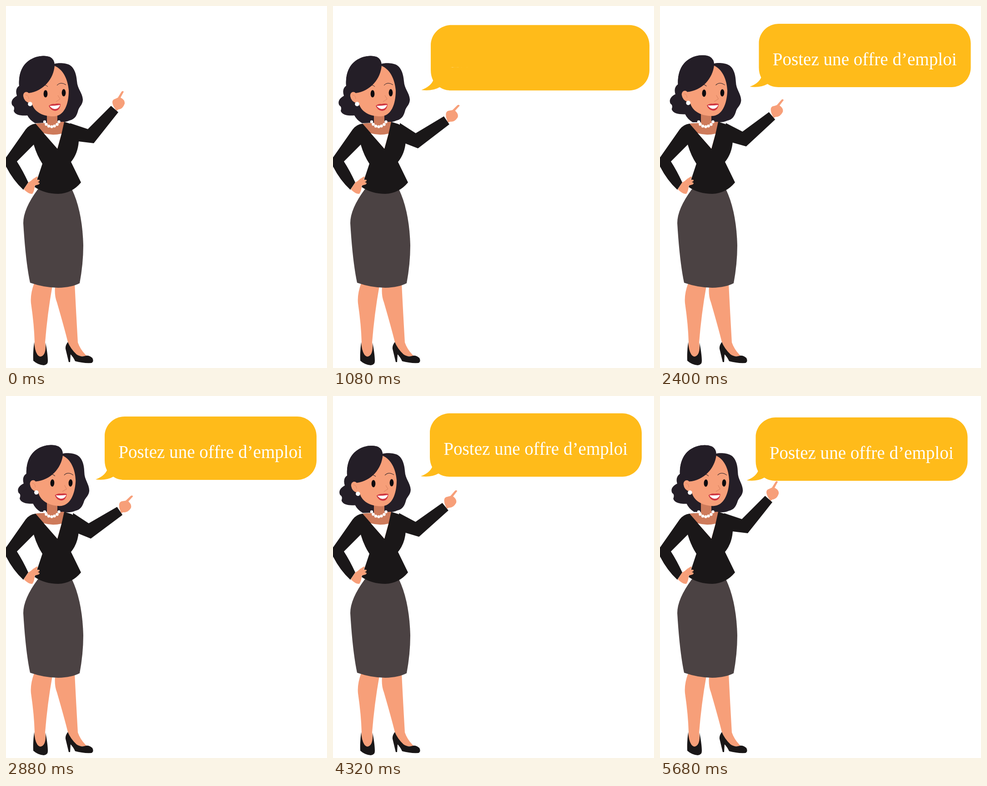
Animation of 706 by 794 pixels, one loop 5.72 s. Source, as an HTML page:

```html
<!DOCTYPE html>
<html lang="fr">
<head>
<meta charset="utf-8">
<style>
  html, body { margin: 0; width: 100%; height: 100%; overflow: hidden; background: #fff; }
  svg { display: block; }
  text { font: 39.1px "Liberation Serif", "Times New Roman", serif; fill: #fff; }
  .skin { fill: #f79f79; }
  .shade { fill: #ce7b5b; }
  .hair { fill: #241e27; }
  .suit { fill: #1a1718; }
  .white { fill: #fff; }
  .line { fill: none; stroke-width: 1; }
</style>
</head>
<body>
<svg width="706" height="794" viewBox="0 0 706 794">
  <g id="bubble">
    <path fill="#ffbb1a" d="M257 43H636C660 43 679 62 679 86V139C679 163 660 182 636 182H256Q242 182 232 175Q216 184 193 181Q212 174 218 161Q213 151 213 139V86C213 62 233 43 257 43Z"/>
    <g id="label"></g>
  </g>

  <path id="backHair" class="hair" d="M64 257Q52 250 47 240C35 241 20 240 17 230Q20 221 14 218C10 211 13 203 24 197Q19 182 29 175C27 148 36 130 50 120C65 109 85 107 97 112Q105 117 106 127C115 124 130 125 137 128C150 133 155 150 156 165C157 182 168 190 169 205C169 216 162 220 159 228C156 240 152 248 140 251Q130 256 115 255Z"/>

  <path class="skin" d="M62 608Q53 632 55 652Q62 700 63 738L61 766Q75 777 89 766L86 738Q91 675 102 614Z"/>
  <path class="skin" d="M108 614Q106 635 112 650Q128 705 136 737L150 768 178 768Q164 755 158 738Q154 670 151 608Z"/>
  <path class="suit" d="M62 737Q59 760 60 778Q70 787 83 788Q92 787 92 779Q92 765 87 738Q89 768 75 769Q64 766 62 737Z"/>
  <path class="suit" d="M136 737Q130 745 131 752L138 781H141L142 764Q148 770 152 779Q170 784 188 783Q194 780 190 772Q183 766 176 767Q165 771 155 764Q142 752 136 737Z"/>
  <path fill="#4b4243" d="M70 402Q38 445 38 476Q43 560 53 607Q85 618 115 618Q145 617 162 608Q170 565 170 525Q168 450 145 402Z"/>

  <path class="suit" d="M65 258Q51 260 43 271L-4 338V345L0 352Q16 383 38 403L49 387Q37 361 24 341L61 304Q68 328 80 346L63 397Q85 412 115 412Q145 411 165 387L143 342Q158 324 160 297L158 268 144 259 128 254Z"/>
  <path class="skin" d="M39 402L49 387Q55 384 60 379L68 374Q72 375 67 381L73 381Q76 384 70 386L74 388Q74 391 70 392L63 394Q63 405 58 412Q50 413 39 402Z"/>
  <path class="shade" d="M90 232H113V254H128L122 281 113 313 65 258 90 256Z"/>
  <path class="white" d="M83 279Q102 285 122 280L113 313Z"/>
  <g id="pearls" class="white"></g>

  <g id="arm">
    <path class="skin" d="M237 221Q231 209 237 205Q242 203 246 201L254 188Q257 185 259 188L252 201Q262 206 261 214Q257 226 247 227L243 230Z"/>
    <path class="suit" d="M141 257L180 270 231 219 247 233 193 301 160 297 145 295Z"/>
  </g>

  <g id="head">
    <path class="skin" d="M106 131C125 138 136 160 138 185C138 216 128 242 104 242C80 242 62 232 57 214L46 190 80 150Z"/>
    <path class="skin" d="M54 190C44 185 37 190 38 198Q40 210 52 213L60 208Z"/>
    <path class="line" stroke="#e08a66" d="M43 195Q50 196 50 204"/>
    <path class="line" stroke="#241e27" d="M82 174Q87 172 92 177M112 174Q120 165 132 173"/>
    <path class="hair" d="M29 176C27 148 36 130 50 120C65 109 85 107 97 112Q107 117 107 130C105 160 82 187 50 191Q46 186 36 190Z"/>
    <circle class="white" cx="53" cy="215" r="4.8"/>
    <ellipse cx="87" cy="192.5" rx="4.4" ry="8" fill="#0e0b0e"/>
    <ellipse cx="127" cy="190.3" rx="4.4" ry="8" fill="#0e0b0e"/>
    <path class="line" stroke="#d9805f" d="M114 196L119 204 110 210"/>
    <path fill="#cf3540" d="M94 219Q100 214 107 215Q114 213 120 215Q119 229 108 230Q98 229 94 219Z"/>
    <path class="white" d="M96 219Q108 219 119 217Q116 226 107 226Q100 225 96 219Z"/>
  </g>
</svg>
<script>
const LOOP = 5720, STEP = 40;
const $ = id => document.getElementById(id);
const NS = 'http://www.w3.org/2000/svg';

function add(parent, tag, attrs, text = '') {
  const el = document.createElementNS(NS, tag);
  for (const k in attrs) el.setAttribute(k, attrs[k]);
  el.textContent = text;
  return parent.appendChild(el);
}

// Smooth curve through [time, value] points
function curve(pts, t) {
  const last = pts.length - 1;
  if (t <= pts[0][0]) return pts[0][1];
  if (t >= pts[last][0]) return pts[last][1];
  const i = pts.findIndex(p => p[0] > t) - 1;
  const [a, b] = [pts[i], pts[i + 1]];
  const slope = j => {
    if (j === 0 || j === last) return 0;
    const [p, q] = [pts[j - 1], pts[j + 1]], v = pts[j][1];
    return (v - p[1]) * (q[1] - v) <= 0 ? 0 : (q[1] - p[1]) / (q[0] - p[0]);
  };
  const d = b[0] - a[0], u = (t - a[0]) / d, w = 1 - u;
  return a[1] * w * w * (1 + 2 * u) + b[1] * u * u * (3 - 2 * u)
    + d * u * w * (slope(i) * w - slope(i + 1) * u);
}

const sway = [[0, 0], [160, 2], [720, 7], [1240, 10], [1520, 14], [1720, 15], [2520, 3.5], [3000, 0]];
const pop = [[340, 0], [600, .43], [860, 1.15], [1080, 1.032], [1220, .99], [1400, 1.01], [1600, 1]];
const driftX = [[600, 0], [1080, 9.5], [1240, 8], [1880, 0], [2300, 5], [2600, 3], [2880, 4],
  [3300, 7], [3680, 3.5], [4320, 0], [5000, 4], [5440, 1], [5680, -2.5]];
const driftY = [[600, 0], [1080, 1], [1500, -2], [1880, 0], [2420, -4], [2880, 2], [3300, -3],
  [3680, -1], [4320, -5], [4440, -6], [4840, -2], [5200, 2], [5440, -1], [5680, 4]];

for (const [x, y] of [[85, 254], [88.5, 259.5], [94, 263.5], [100.5, 264.7], [106.5, 263.3], [112.5, 259.7], [116.5, 254]])
  add($('pearls'), 'circle', { cx: x, cy: y, r: 3.2 });

const phrase = 'Postez une offre d’emploi';
const pen = document.createElement('canvas').getContext('2d');
pen.font = '39.1px "Liberation Serif", "Times New Roman", serif';
let penX = 243.3;
const letters = [...phrase].map(ch => {
  const letter = { x: penX, el: add($('label'), 'text', {}, ch) };
  penX += pen.measureText(ch).width;
  return letter;
});

function draw(t) {
  const lower = 7.5 * (1 - Math.cos(t / 1880 * 2 * Math.PI));
  $('arm').setAttribute('transform', `rotate(${lower} 145 282)`);

  const lean = t < 1160 ? 0 : curve(sway, (t - 1160) % 3000);
  const turn = `rotate(${lean / 290 * 180 / Math.PI} 127 480)`;
  $('head').setAttribute('transform', turn);
  $('backHair').setAttribute('transform', turn);

  const s = curve(pop, t);
  $('bubble').setAttribute('visibility', s > 0 ? 'visible' : 'hidden');
  $('bubble').setAttribute('transform',
    `translate(${446 + curve(driftX, t)} ${112.5 + curve(driftY, t)}) scale(${s}) translate(-446 -112.5)`);

  // Letters rise from the baseline and straighten up one after another
  letters.forEach(({ x, el }, i) => {
    const p = Math.min(1, Math.max(0, (t - 1040 - 19 * i) / 480));
    const rise = Math.min(1, p / .75) ** 2;
    el.setAttribute('visibility', p > 0 && s > 0 ? 'visible' : 'hidden');
    el.setAttribute('transform',
      `translate(${x + 10 * (1 - p)} 133.5) skewX(${-80 * (1 - p)}) scale(1 ${rise})`);
  });
}

function frame() {
  draw(Math.floor(performance.now() % LOOP / STEP) * STEP);
  requestAnimationFrame(frame);
}
frame();
</script>
</body>
</html>
```
